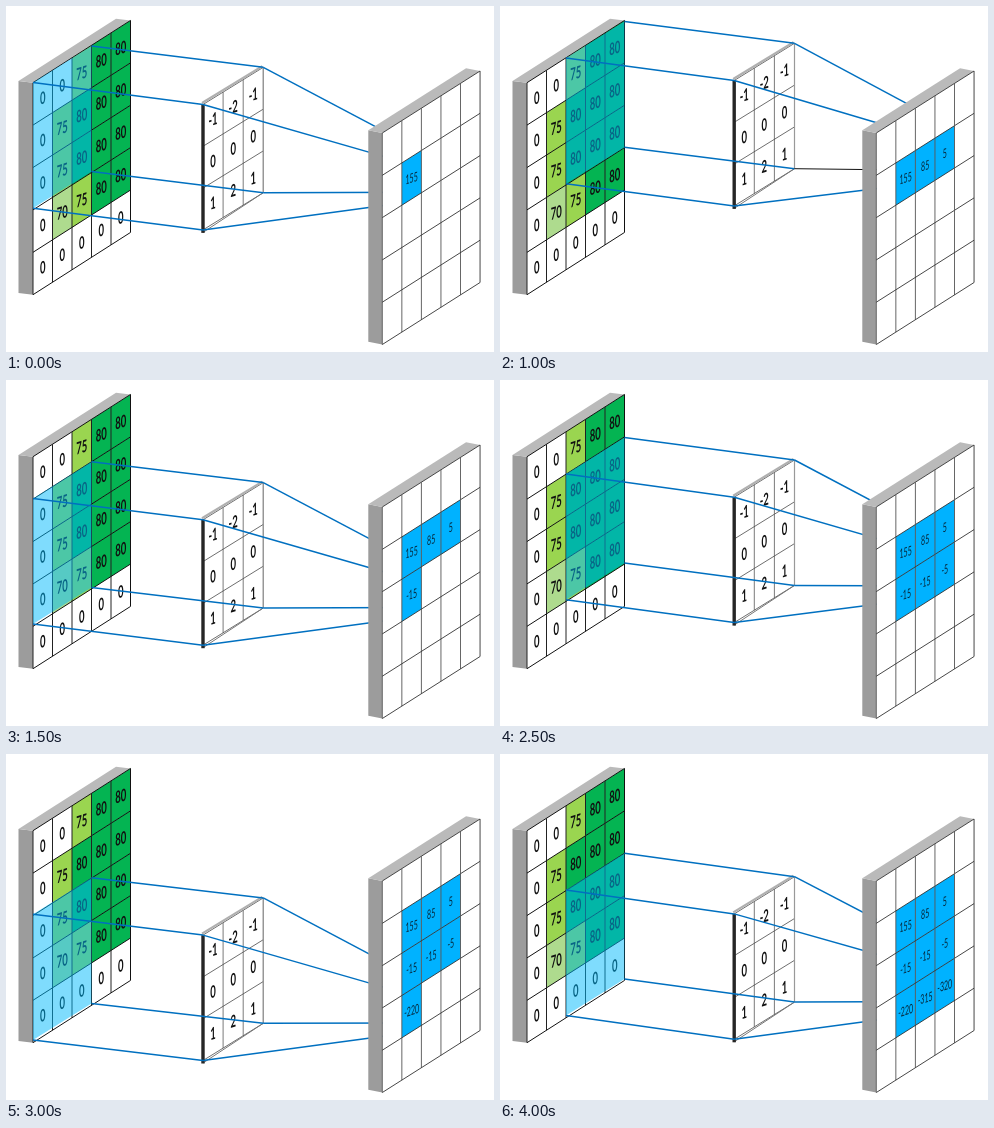
An HTML page with a canvas that plays this animation: 488x346 px, repeating every 4.5 s.

```html
<!DOCTYPE html>
<html lang="en">
<head>
<meta charset="utf-8">
<title>Convolution</title>
<style>
  html, body { margin: 0; width: 100%; height: 100%; overflow: hidden; background: #fff; }
  canvas { display: block; width: 488px; height: 346px; }
</style>
</head>
<body>
<canvas id="stage" width="488" height="346"></canvas>
<script>
const ctx = document.getElementById('stage').getContext('2d');
const STEP = 500, STEPS = 9;
const BLUE = '#0070c0', FILL = '#00b2ff', GLASS = 'rgba(0,186,252,0.5)';
const TILT = 0.5;

const input = [
  [0, 0, 75, 80, 80],
  [0, 75, 80, 80, 80],
  [0, 75, 80, 80, 80],
  [0, 70, 75, 80, 80],
  [0, 0, 0, 0, 0]
];
const kernel = [[-1, -2, -1], [0, 0, 0], [1, 2, 1]];
const output = [155, 85, 5, -15, -15, -5, -220, -315, -320];
const shades = { 70: '#aedb8e', 75: '#9ad550', 80: '#04b452' };

// Slanted grid: columns rise by `rise`, rows go straight down.
const left = { x: 27, y: 76.7, w: 19.5, h: 42.4, rise: 12.45, n: 5 };
const right = { x: 376.3, y: 127, w: 19.55, h: 42.3, rise: 12.4, n: 5 };

// Where the window sits on the input, and where the rays aim on the output.
const lens = { x: 27, y: 76.5, w: 19.5, h: 41.9, rise: 12.2 };
const aim = { x: 376.3, y: 125, w: 19.55, h: 41.4, rise: 10.8 };

function at(g, c, r) {
  return [g.x + c * g.w, g.y + r * g.h - c * g.rise];
}

// Corners in the order TL, TR, BR, BL.
function corners(g, c, r, size) {
  return [at(g, c, r), at(g, c + size, r), at(g, c + size, r + size), at(g, c, r + size)];
}

function trace(points) {
  ctx.beginPath();
  points.forEach(([x, y]) => ctx.lineTo(x, y));
}

function poly(points, fill) {
  trace(points);
  ctx.closePath();
  ctx.fillStyle = fill;
  ctx.fill();
}

function line(points, color, width) {
  trace(points);
  ctx.strokeStyle = color;
  ctx.lineWidth = width;
  ctx.stroke();
}

function gridLines(g, rowColor, colColor, width) {
  for (let i = 0; i <= g.n; i++) {
    line([at(g, i, 0), at(g, i, g.n)], i < g.n ? colColor : rowColor, width);
    line([at(g, 0, i), at(g, g.n, i)], rowColor, width);
  }
}

function label(g, c, r, text, font, size, squeeze, color) {
  const [x, y] = at(g, c + 0.5, r + 0.5);
  ctx.save();
  ctx.transform(squeeze, -squeeze * TILT * g.rise / g.w, 0, 1, x, y);
  ctx.font = `${font} ${size}px Lato, "Open Sans", sans-serif`;
  ctx.textAlign = 'center';
  ctx.fillStyle = color;
  ctx.fillText(text, 0, size * 0.36);
  ctx.restore();
}

function slab(g, dx, dy) {
  const [tl, tr, br, bl] = corners(g, 0, 0, g.n);
  const back = ([x, y]) => [x - dx, y - dy];
  poly([back(tl), tl, bl, back(bl)], '#9c9c9c');
  poly([back(tl), back(tr), tr, tl], '#bababa');
  poly([tl, tr, br, bl], '#fff');
}

function drawInput(col, row) {
  slab(left, 14.5, 1.8);
  input.forEach((vals, r) => vals.forEach((v, c) => {
    if (v) poly(corners(left, c, r, 1), shades[v]);
  }));
  gridLines(left, '#111', '#222', 1);
  input.forEach((vals, r) => vals.forEach((v, c) => {
    label(left, c, r, v, 'bold', 17, 0.56, '#111');
  }));
  poly(corners(lens, col, row, 3), GLASS);
}

function drawKernel(g) {
  const [tl, tr, br, bl] = corners(g, 0, 0, 3);
  poly([tl, tr, br, [bl[0], bl[1] + 2]], '#fff');
  gridLines(g, '#4a4a4a', '#5a5a5a', 0.8);
  line([[tl[0] - 1, tl[1] - 1.5], [tr[0] - 1, tr[1] - 1]], '#b0b0b0', 2.2);
  line([tr, br], '#999', 1.2);
  line([[bl[0], bl[1] + 2.5], br], '#777', 1);
  line([tl, [bl[0], bl[1] + 3]], '#262626', 3.4);
  kernel.forEach((vals, r) => vals.forEach((v, c) => {
    label(g, c, r, String(v), 'bold', 17, 0.56, '#111');
  }));
}

function drawRays(g, col, row) {
  const from = corners(lens, col, row, 3);
  const mid = corners(g, 0, 0, 3);
  const to = corners(aim, col + 1, row + 1, 1);
  from.forEach((p, i) => {
    line([p, mid[i]], BLUE, 1.5);
    const dark = i === 2 && col === 2 && row === 0;
    line([mid[i], to[i]], dark ? '#111' : BLUE, dark ? 1 : 1.5);
  });
}

function drawOutput(step) {
  slab(right, 14, 2.7);
  const shown = output.slice(0, step + 1);
  const place = i => [1 + i % 3, 1 + Math.floor(i / 3)];
  shown.forEach((v, i) => poly(corners(right, ...place(i), 1), FILL));
  gridLines(right, '#333', '#555', 0.9);
  shown.forEach((v, i) => {
    label(right, ...place(i), String(v), 'normal', 13, 0.54, '#06283c');
  });
}

function draw(step) {
  const col = step % 3, row = Math.floor(step / 3);
  const g = {
    x: 197 + col * 18.6,
    y: 98.5 + row * 41.3 - col * 12 + row * col * 0.7,
    w: 20.1, h: 41.8, rise: 12.4, n: 3
  };
  ctx.clearRect(0, 0, 488, 346);
  drawInput(col, row);
  drawKernel(g);
  drawRays(g, col, row);
  drawOutput(step);
}

const start = performance.now();
function tick() {
  const t = Math.max(0, performance.now() - start);
  draw(Math.floor(t / STEP) % STEPS);
  requestAnimationFrame(tick);
}
tick();
</script>
</body>
</html>
```
